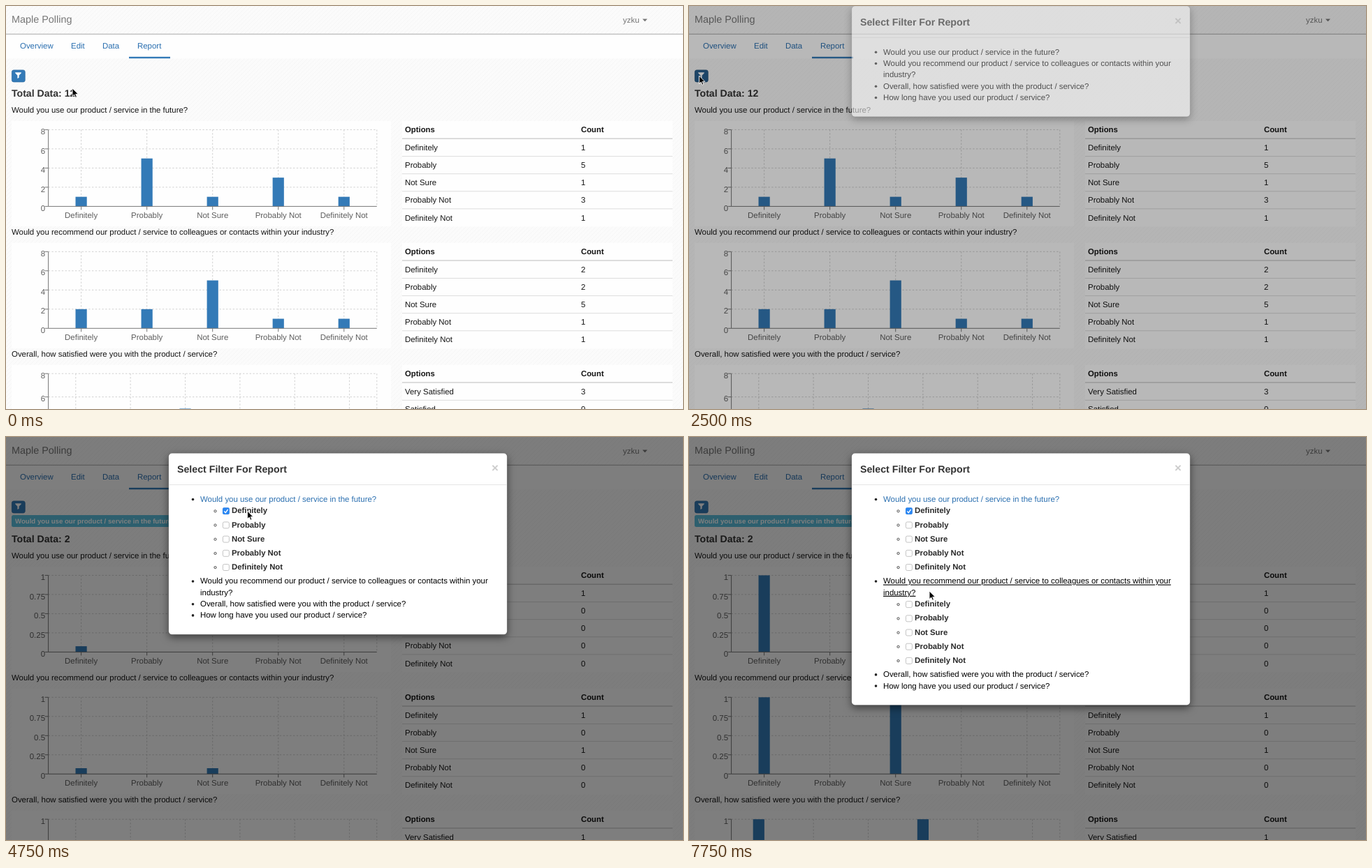
Recreate the animation shown at these times as an HTML page. Size 969 px wide and 578 px high, loop 8 s.

```html
<!DOCTYPE html>
<html lang="en">
<head>
<meta charset="utf-8">
<title>Survey report</title>
<style>
  html, body { margin: 0; width: 100%; height: 100%; overflow: hidden; background: #fbfbfb; }
  svg { display: block; width: 969px; height: 578px; }
  text {
    font: 11.44px "Liberation Sans", Arial, sans-serif; fill: #151515;
    white-space: pre; text-rendering: geometricPrecision;
  }
  .b { font-weight: bold; font-size: 11.33px; }
  .h { font-weight: bold; font-size: 14.1px; fill: #333; }
  .tag { font-weight: bold; font-size: 9.65px; fill: #fff; }
  .blue { fill: #2a6fb0; }
  .tick { fill: #5e5e5e; }
  .box { filter: drop-shadow(0 4px 6px rgba(0, 0, 0, .5)); }
</style>
</head>
<body>
<svg id="stage" viewBox="0 0 969 578"></svg>
<script>
const LOOP = 8000, STEP = 250;
const BLUE = '#337ab7', LINK = '#2a6fb0';
const LIKELY = ['Definitely', 'Probably', 'Not Sure', 'Probably Not', 'Definitely Not'];
const SATISFIED = ['Very Satisfied', 'Satisfied', 'Neutral', 'Unsatisfied', 'Very Unsatisfied', 'N/A'];
const Q = [
  'Would you use our product / service in the future?',
  'Would you recommend our product / service to colleagues or contacts within your industry?',
  'Overall, how satisfied were you with the product / service?',
  'How long have you used our product / service?'
];
const Q2_LINES = [Q[1].replace(' industry?', ''), 'industry?'];

const text = (x, y, s, attrs = '') => `<text x="${x}" y="${y}" ${attrs}>${s}</text>`;
const rect = (x, y, w, h, fill, attrs = '') =>
  `<rect x="${x}" y="${y}" width="${w}" height="${h}" fill="${fill}" ${attrs}/>`;
const path = (d, stroke, attrs = '') => `<path d="${d}" fill="none" stroke="${stroke}" ${attrs}/>`;
const group = (id, body, attrs = '') => `<g id="${id}" ${attrs}>${body}</g>`;

function chart(y0, labels, counts, max, height) {
  const left = 60.6, right = 530.8, top = y0 + 12.4, base = top + height;
  const pitch = (right - left) / labels.length;
  const mid = i => left + pitch * (i + .5);
  let grid = '', axes = `M${left} ${top}V${base}H${right}`, out = '';
  for (let i = 0; i <= 4; i++) {
    const y = base - height * i / 4;
    if (i) grid += `M${left} ${y}H${right}`;
    axes += `M${left - 5} ${y}H${left}`;
    out += text(56, y + 6.6, max * i / 4, 'class="tick" text-anchor="end"');
  }
  labels.forEach((name, i) => {
    grid += `M${mid(i)} ${top}V${base}`;
    axes += `M${mid(i)} ${base}v5`;
    out += text(mid(i), base + 16.6, name, 'class="tick" text-anchor="middle"');
  });
  grid += `M${right} ${top}V${base}`;
  const bars = counts.map((n, i) => {
    const h = height * n / max;
    return n ? rect(mid(i) - 8.1, base - h, 16.2, h, BLUE, `class="bar" data-base="${base}" data-h="${h}"`) : '';
  }).join('');
  return rect(8, y0, 543, height + 41, '#fefefe') +
    path(grid, '#ccc', 'stroke-dasharray="2.4 2.4" stroke-width=".9"') + bars +
    path(axes, '#777') + out;
}

function table(y0, labels, counts) {
  const x = 567, w = 387;
  let out = rect(x, y0, w, 26 + labels.length * 25.1, '#fefefe') +
    text(571, y0 + 16.2, 'Options', 'class="b"') + text(823, y0 + 16.2, 'Count', 'class="b"') +
    path(`M${x} ${y0 + 25.2}h${w}`, '#d2d2d2', 'stroke-width="1.5"');
  labels.forEach((name, i) => {
    const y = y0 + 42.1 + i * 25.1;
    if (i) out += path(`M${x} ${y - 16.6}h${w}`, '#ddd');
    out += text(571, y, name) + text(823, y, counts[i]);
  });
  return out;
}

// The part of the page below the toolbar
function report(total, data, max, dy) {
  let out = text(8, 130.2 + dy, 'Total Data: ' + total, 'class="h"');
  data.forEach((counts, k) => {
    const y0 = 165 + 174.9 * k + dy, labels = k < 2 ? LIKELY : SATISFIED;
    out += text(8, y0 - 12, Q[k]) + chart(y0, labels, counts, max, k < 2 ? 110 : 134) + table(y0, labels, counts);
  });
  return out;
}

function page() {
  const tabs = [[20, 'Overview'], [93, 'Edit'], [138, 'Data'], [188, 'Report']];
  const tag = rect(8, 112, 308, 17, '#5bc0de', 'rx="2.5"') +
    text(13, 124, Q[0] + ' Definitely', 'class="tag"');
  return rect(0, 0, 969, 578, 'url(#weave)') +
    text(8, 24.3, 'Maple Polling', 'style="font-size:14.4px;fill:#777"') +
    text(883, 23.8, 'yzku', 'style="fill:#777"') +
    '<path d="M911 18.6h7l-3.5 3.6z" fill="#777"/>' +
    rect(0, 39.7, 969, 1.3, '#bcbcbc') + rect(0, 41, 969, 34.5, '#fefefe') +
    tabs.map(([x, s]) => text(x, 60.7, s, 'class="blue"')).join('') +
    rect(176, 72.8, 59, 2.4, BLUE) +
    rect(8.4, 91.9, 18.8, 17, BLUE, 'id="btn" rx="2.6" stroke="#2e6da4" stroke-width=".8"') +
    '<path d="M13.2 95.2h8.6v1l-3.2 3.4v3.2l-2.2 1.3v-4.5l-3.2-3.4z" fill="#fff"/>' +
    group('before', report(12, [[1, 5, 1, 3, 1], [2, 2, 5, 1, 1], [3, 0, 5, 2, 1, 1]], 8, 0)) +
    group('after', tag + report(2, [[1, 0, 0, 0, 0], [1, 0, 1, 0, 0], [1, 0, 0, 1, 0, 0]], 1, 21));
}

const bullet = y => `<circle cx="267.5" cy="${y + .5}" r="1.8" fill="#222"/>`;
const line = (y, s, attrs = '') => text(278, y + 4, s, 'style="fill:#000" ' + attrs);

function choices(id, y0) {
  return group(id, LIKELY.map((name, i) => {
    const y = y0 + i * 20.2;
    return `<circle cx="299.5" cy="${y + 1}" r="1.6" fill="none" stroke="#333" stroke-width=".9"/>` +
      rect(310.4, y - 3.6, 9, 9, '#fff', 'rx="2" stroke="#b5b5b5" stroke-width=".8"') +
      text(323, y + 4, name, 'class="b" style="fill:#2a2a2a"');
  }).join(''));
}

function modal() {
  const check = rect(310, 101.2, 9.8, 9.8, '#2b87f3', 'rx="2"') +
    path('M312.2 106.4l2 2.2 3.4-4.8', '#fff', 'stroke-width="1.4"');
  return rect(232.8, 23.3, 484.4, 158.8, '#fff', 'id="card" class="box" rx="4.8" stroke="#000" stroke-opacity=".2" stroke-width=".8"') +
    text(245, 51, 'Select Filter For Report', 'class="h" style="font-size:14.2px"') +
    text(700, 50, '×', 'text-anchor="middle" style="font-weight:bold;font-size:17px;fill:#ccc"') +
    path('M233.5 68.5h483', '#e5e5e5') +
    bullet(89) + line(89, Q[0], 'id="q1"') +
    choices('opts1', 105.3) + group('check', check) +
    group('second', bullet(105.3) + group('q2', line(105.3, Q2_LINES[0]) + line(121.6, Q2_LINES[1])) +
      choices('opts2', 138)) +
    group('rest', bullet(138) + line(138, Q[2]) + bullet(154.2) + line(154.2, Q[3]));
}

const $ = id => document.getElementById(id);
$('stage').innerHTML =
  `<defs><pattern id="weave" width="6" height="6" patternUnits="userSpaceOnUse">
    ${rect(0, 0, 6, 6, '#fbfbfb')}${path('M0 3l3-3M3 6l3-3M1 1l1 1M4 4l1 1', '#f5f5f5', 'stroke-width=".8"')}
  </pattern></defs>` +
  page() + rect(0, 0, 969, 578, '#000', 'id="shade"') + group('modal', modal()) +
  group('cursor', '<path d="M0 0V11.6L2.7 9.1 4.5 13.2 6.4 12.4 4.7 8.4H8.3z" fill="#000" stroke="#fff" stroke-width=".9"/>');
const grown = [...document.querySelectorAll('#after .bar')];

// Time, x, y of the pointer tip
const MOVES = [
  [0, 95, 118], [250, 101, 116], [500, 88, 108], [1000, 36, 96], [1250, 20, 96], [1500, 14.5, 99],
  [2000, 14.5, 100], [2500, 14.5, 100], [2750, 97.5, 99.5], [3000, 325, 90], [3250, 345, 88],
  [3750, 345, 90], [4250, 345, 104], [4500, 345.5, 106], [5000, 345.5, 106], [5500, 345.5, 126],
  [6000, 345.5, 149.5], [6750, 345, 194], [7250, 344, 221], [8000, 344, 221]
];

const clamp = v => Math.max(0, Math.min(1, v));

function pointer(t) {
  const i = MOVES.findIndex(m => m[0] > t);
  const [t0, x0, y0] = MOVES[i - 1], [t1, x1, y1] = MOVES[i];
  const k = (t - t0) / (t1 - t0);
  return [x0 + (x1 - x0) * k, y0 + (y1 - y0) * k];
}

// Cubic Bezier timing curve
function bezier(x, x1, y1, x2, y2) {
  const at = (s, a, b) => 3 * s * (1 - s) * (1 - s) * a + 3 * s * s * (1 - s) * b + s * s * s;
  let lo = 0, hi = 1;
  for (let i = 0; i < 24; i++) {
    const m = (lo + hi) / 2;
    if (at(m, x1, x2) < x) lo = m; else hi = m;
  }
  return at(lo, y1, y2);
}

const set = (id, name, value) => $(id).setAttribute(name, value);
const show = (id, on) => set(id, 'display', on ? 'inline' : 'none');
const shift = (id, x, y) => set(id, 'transform', `translate(${x} ${y})`);

function render(t) {
  const open = 2416, filter = 4620;
  const fade = clamp((t - open) / 150);
  const slide = bezier(clamp((t - open) / 300), 0, 0, .58, 1);
  const first = t >= 3500, second = t >= 7250, checked = t >= 4500, filtered = t >= filter;
  const pressed = t >= 2000 && t < 2750;

  set('btn', 'fill', pressed ? '#286090' : BLUE);
  set('btn', 'stroke', pressed ? '#204d74' : '#2e6da4');
  show('before', !filtered);
  show('after', filtered);
  const grow = bezier(clamp((t - filter) / 1500), .25, .1, .25, 1);
  for (const bar of grown) {
    const h = bar.dataset.h * grow;
    bar.setAttribute('y', bar.dataset.base - h);
    bar.setAttribute('height', h);
  }

  set('shade', 'opacity', fade / 2);
  show('modal', fade > 0);
  set('modal', 'opacity', fade);
  shift('modal', 0, -40 * (1 - slide));
  set('card', 'height', 158.8 + 101.2 * (first + second));
  show('opts1', first);
  show('opts2', second);
  show('check', checked);
  $('q1').style.fill = checked ? LINK : '#000';
  set('q1', 'text-decoration', t >= 3000 && t < 4000 ? 'underline' : 'none');
  set('q2', 'text-decoration', t >= 7000 ? 'underline' : 'none');
  shift('second', 0, first ? 101.2 : 0);
  shift('rest', 0, 101.2 * (first + second));
  shift('cursor', ...pointer(t));
}

function tick(now) {
  const t = (now - start) % LOOP;
  render(Math.max(0, Math.floor(t / STEP) * STEP));
  requestAnimationFrame(tick);
}
const start = performance.now();
render(0);
requestAnimationFrame(tick);
</script>
</body>
</html>
```
